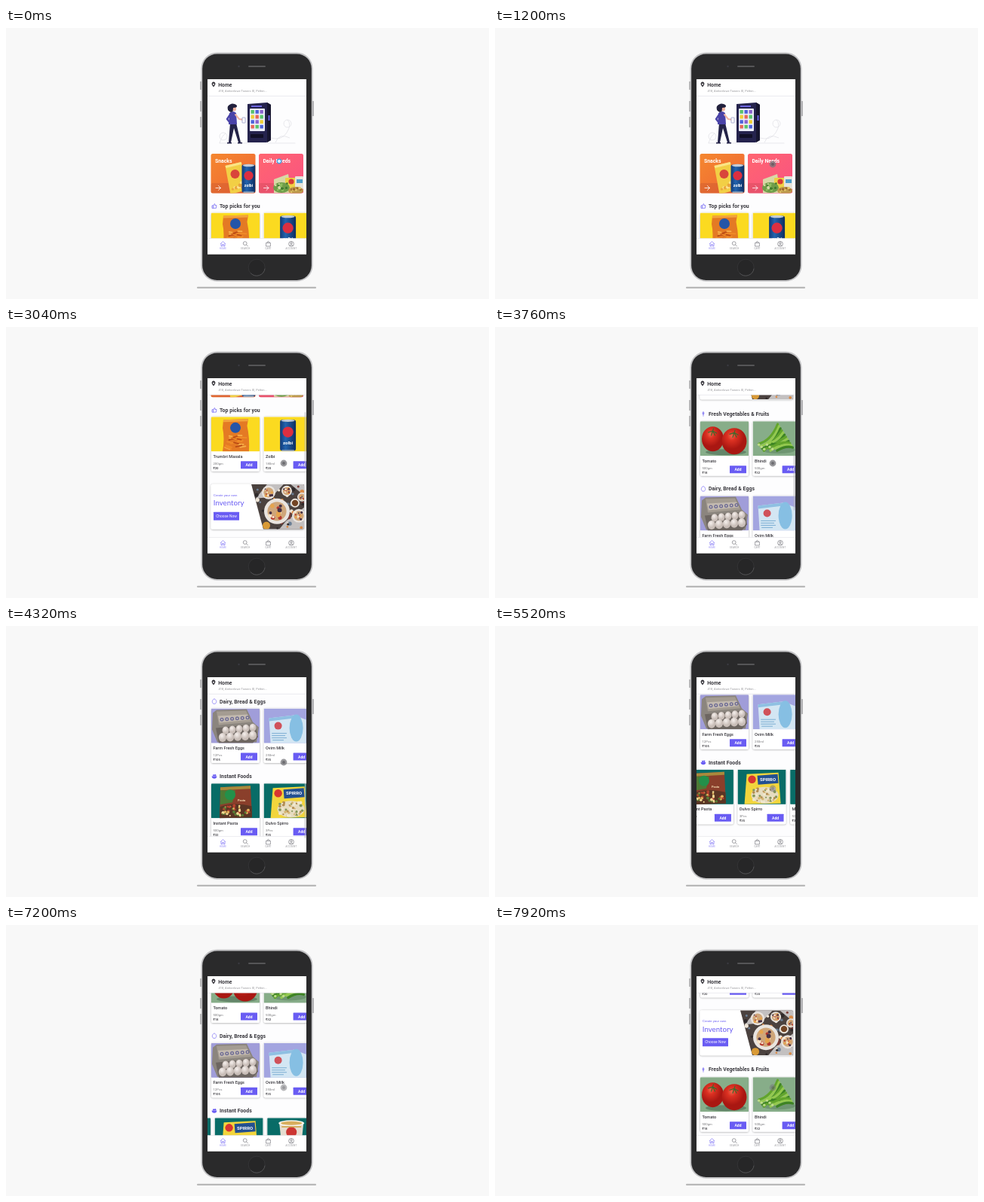
An HTML page for the animation above (8000 ms loop, 640x360 px).

```html
<!DOCTYPE html>
<html lang="en">
<head>
<meta charset="utf-8">
<title>Grocery app scroll</title>
<style>
html, body { margin: 0; width: 100%; height: 100%; overflow: hidden; background: #f8f8f8; }
svg { display: block; width: 100vw; height: 100vh; }
text { font-family: Roboto, Arial, sans-serif; }
</style>
</head>
<body>
<svg id="stage" viewBox="0 0 640 360"></svg>
<script>
const LOOP = 8000, BLUE = '#695cf3', INK = '#3a393f';

const rect = (x, y, w, h, fill, r = 0, more = '') =>
  `<rect x="${x}" y="${y}" width="${w}" height="${h}" rx="${r}" fill="${fill}" ${more}/>`;
const circle = (x, y, r, fill, more = '') => `<circle cx="${x}" cy="${y}" r="${r}" fill="${fill}" ${more}/>`;
const oval = (x, y, a, b, fill, more = '') =>
  `<ellipse cx="${x}" cy="${y}" rx="${a}" ry="${b}" fill="${fill}" ${more}/>`;
const shape = (d, fill, more = '') => `<path d="${d}" fill="${fill}" ${more}/>`;
const line = (d, color, w = 1) =>
  `<path d="${d}" fill="none" stroke="${color}" stroke-width="${w}" stroke-linecap="round" stroke-linejoin="round"/>`;
const text = (x, y, size, s, fill = INK, weight = 400, more = '') =>
  `<text x="${x}" y="${y}" font-size="${size}" font-weight="${weight}" fill="${fill}" ${more}>${s}</text>`;
const at = (x, y, body) => `<g transform="translate(${x} ${y})">${body}</g>`;
const times = (n, f) => Array.from({ length: n }, (_, i) => f(i)).join('');
const mid = 'text-anchor="middle"';

// Seeded random numbers for crumbs and garnish
let seed = 7;
const rnd = () => (seed = (seed * 16807) % 2147483647) / 2147483647;
const specks = (n, x, y, w, h, colors, r = 1.5) =>
  times(n, i => circle((x + rnd() * w).toFixed(1), (y + rnd() * h).toFixed(1), r * (.6 + rnd() * .7), colors[i % colors.length]));

const can = (w, h) =>
  rect(0, 1, w, h - 2, 'url(#can)', w * .14) +
  oval(w / 2, 2, w * .42, 1.7, '#c3ccd6') +
  rect(w * .1, h - 2.2, w * .8, 1.8, '#9aa8b8', .8) +
  circle(w / 2, h * .4, w * .34, '#dc2f40') +
  text(w / 2, h * .78, w * .29, 'zolbi', '#fff', 700, mid);

const plate = (x, y, r) =>
  circle(x, y, r, '#e9e4df') + circle(x, y, r * .74, '#cfa67a') +
  specks(12, x - r * .55, y - r * .55, r * 1.1, r * 1.1, ['#b5382d', '#e6a44d', '#f6e4c8', '#473246'], r * .15);

const tomato = (x, y, a, b) =>
  oval(x, y, a, b, 'url(#tom)') +
  line(`M${x} ${y - b * .65}l-6 2m6 -2l5 3m-5 -3l-2 6m2 -6l3 6m-3 -6l1 -3`, '#3f6a2c', 1.2);

// Product pictures, 64 by 46 each
const pics = {
  snack: () => rect(0, 0, 64, 46, '#fbda20') +
    shape('M16 4L49 3L47.5 12Q51 28 50 46H15Q18 28 15 15Z', '#e47a24') +
    shape('M16 4L49 3L48.5 6L16 7Z', '#f3a53c') +
    circle(32, 14.5, 7, '#2455a8') +
    times(22, () => line(`M${18 + rnd() * 23} ${24 + rnd() * 18}l${4 + rnd() * 4} ${rnd() * 6 - 3}`, ['#f7b04a', '#bb4b15', '#f08c28'][rnd() * 3 | 0], 1.8)),
  can: () => rect(0, 0, 64, 46, '#fbda20') + at(21.5, 3, can(21, 43)),
  tomato: () => rect(0, 0, 64, 46, '#87ad89') + oval(34, 41, 27, 4, '#64866a') +
    tomato(16.5, 23.5, 14.5, 16.5) + tomato(45, 26.5, 16.5, 17.5),
  okra: () => rect(0, 0, 64, 46, '#87ad89') + oval(34, 38, 22, 5, '#6f9672') +
    times(12, i => line(`M${8 + i * 2.2} ${30 + i % 4 * 3}Q${24 + i * 1.8} ${26 + i % 3 * 3} ${33 + i * 1.8} ${4 + i * 2.8}`, ['#62a52c', '#93c94e', '#3e8423'][i % 3], 3.2)) +
    times(6, i => circle(8 + i * 3.6, 31 + i % 3 * 3, 1.7, '#bddb8a')),
  eggs: () => rect(0, 0, 64, 46, '#a09dd9') +
    shape('M2 6L7 2L47 1L55 18L63 25L60 45H8L1 28Z', '#8b857e') +
    shape('M7 4L46 3L53 18L10 22Z', '#a49c92') + shape('M9 10L48 8L51 15L11 19Z', '#c3bab0') +
    times(6, i => circle(14 + i * 6.8, 14.6 - i * .5, 2.5, '#6f6d94') + circle(14 + i * 6.8, 14.6 - i * .5, 1, '#d8cec0')) +
    shape('M6 26L58 21L62 38L55 46H10Z', '#6d6661') +
    times(5, i => oval(19 + i * 9, 29 - i * .9, 4.5, 5.2, 'url(#egg)')) +
    times(5, i => oval(15 + i * 10, 38.5 - i * .7, 5.2, 6, 'url(#egg)')),
  milk: () => rect(0, 0, 64, 46, '#a3a5e0') +
    shape('M7 13L40 9L56 15V46H9Z', '#d3e6f3') + shape('M7 13L40 9L40.5 13L7 17Z', '#8fc0e2') +
    circle(19, 23, 5, '#d0525a') + oval(43, 26, 9, 18, '#86bfe3') +
    line('M11 33H30M11 36H28M11 39H30M12 42H26', '#7caed3', 1),
  pasta: () => rect(0, 0, 64, 46, '#086c67') +
    shape('M12 5L52 3L54 45L11 46Z', '#8a3f2b') + shape('M12 5L52 3V7L12 9Z', '#a98a3c') +
    shape('M12 9H32L28 25L12 28Z', '#4d7a35') +
    circle(25, 15, 7, '#23904a') + text(35, 24, 4, 'Pasta', '#f5dbb0', 700) +
    shape('M11.5 31Q30 24 53.5 30L54 45L11 46Z', '#5a3524') +
    specks(42, 14, 29, 37, 14, ['#e3b35b', '#b5422e', '#f1d992', '#587c35'], 1.6),
  spiral: () => rect(0, 0, 64, 46, '#086c67') +
    shape('M12 6L54 4L57 45L9 46Z', '#f2d53c') + circle(19, 13, 5.2, '#d83631') +
    shape('M26 8L53 6L54 18L27 20Z', '#245091') + text(40, 15.2, 6, 'SPIRRO', '#fff', 700, mid) +
    oval(36, 34, 18, 11, '#e6dcc0') + specks(42, 21, 25, 30, 18, ['#d4b573', '#f0e8cf', '#84965a', '#b18b52'], 1.6),
  cup: () => rect(0, 0, 64, 46, '#086c67') +
    shape('M16 7H48L44 46H20Z', '#e6ddd0') + oval(32, 7, 17, 4, '#f7f3ea') + oval(32, 7, 14, 2.5, '#d7ae5d') +
    circle(32, 19, 7, '#cc3633') + rect(19, 11, 26, 1.5, '#cf9f3e') +
    specks(30, 22, 30, 20, 14, ['#c9402e', '#e1b356', '#528f45', '#eedda9'])
};

const card = (x, y, name, qty, price, pic) => at(x, y,
  rect(0, 0, 64, 72.5, '#fff', 2, 'filter="url(#soft)"') +
  `<g clip-path="url(#pic)">${pics[pic]()}</g>` +
  text(2.4, 54.7, 5.55, name, INK, 500) +
  text(2.4, 63.6, 4.3, qty, '#77777a') + text(2.4, 69.6, 4.3, price, INK, 500) +
  rect(39, 59, 22, 10, BLUE, .5) + text(50, 66, 5, 'Add', '#fff', 700, mid));

const row = (y, items) => items.map((it, i) => card(272 + i * 69.6, y, ...it)).join('');
const heading = (y, s, icon) => at(276, y - 2.5, icon) + text(283, y, 6.9, s, INK, 700, 'letter-spacing=".04"');

const icons = {
  thumb: line('M-2.6 -.6h1.3v3.4h-1.3zM-1.3 -.4L.3 -3Q1.5 -2.7 .9 -.8H3L2.4 2.8H-1.3', BLUE, .7),
  leaf: shape('M0 -3.3Q3 -.5 0 2Q-3 -.5 0 -3.3', '#a79ff5') + line('M0 -1V3.4', BLUE, .6),
  egg: shape('M0 -3.4C3.6 -2 3.6 3.3 0 3.3S-3.6 -2 0 -3.4', 'none', `stroke="${BLUE}" stroke-width=".6"`),
  bowl: shape('M-3.4 -.3H3.4Q3 3 0 3T-3.4 -.3', BLUE) + circle(-1, -1.4, 1.1, BLUE) + circle(1.2, -1.5, 1.2, BLUE)
};

const hero = () =>
  line('M283 153H383', '#d9d9e0', .6) +
  `<g fill="none" stroke="#e2e2e8" stroke-width=".8"><circle cx="288" cy="144" r="5"/><circle cx="373" cy="127" r="5"/>
   <path d="M351 146Q365 150 372 139T373 122M283 153Q286 143 291 140M357 152Q362 139 376 146"/></g>` +
  // Shopper
  shape('M297 126L295 152H298L302 133L308 152H311L305 126Z', '#242348') +
  shape('M293 152H299V153.5H293ZM307 152H313V153.5H307Z', '#242348') +
  shape('M296 113Q301 109 305 113L306 128H295Z', '#4a43a8') +
  line('M304 115L309 121L315 122', '#f0b3a1', 2) + line('M297 115L293 121L297 126', '#4a43a8', 2.4) +
  circle(302, 107.5, 3, '#f0b3a1') +
  shape('M298 112Q292 109 294 104Q298 99 303 101Q308 103 305 105.5L301 106L300.5 111Z', '#22213d') +
  rect(313, 119, 4, 7, '#fff', .5, 'stroke="#777ab5" stroke-width=".6"') +
  // Vending machine
  shape('M320 101L346 99L351 102V149L345 152H320Z', '#25234d') +
  shape('M346 99L351 102V149L346 152Z', '#17162f') +
  rect(323, 107, 20, 30, '#eceef8', 1) +
  times(12, i => rect(324.5 + i % 3 * 6, 109 + (i / 3 | 0) * 6.6, 4.4, 4.8, ['#5ac46c', '#f0cf35', '#4d63db', '#e7685b', '#8a63cf'][i * 2 % 5], .5)) +
  rect(324, 141, 17, 5, '#111026', 1) + rect(347.5, 116, 2, 7, '#6a63e8') +
  rect(325, 103, 14, 2, '#6c65df');

const tile = (x, label, fill, body) => at(x, 167,
  rect(0, 0, 59, 52.5, fill, 2.5) + rect(0, 39, 59, 13.5, '#93302f', 2, 'opacity=".18"') +
  `<g clip-path="url(#tile)">${body}</g>` +
  text(5.4, 11.8, 6.9, label, '#fff', 700) + line('M6.5 45.5h6.5m-3 -3l3 3l-3 3', '#fff', .8));

const tiles = () =>
  tile(271.5, 'Snacks', 'url(#orange)',
    at(18, 14, shape('M1 2L22 -3L30 34L8 40Z', '#f2cf45') + shape('M1 2L22 -3L23 0L2 5Z', '#fbe486') +
      circle(14, 13, 6, '#d9453b') + specks(9, 11, 23, 14, 11, ['#eaa63d', '#fbe391'], 2)) +
    at(41, 13.5, can(18, 39))) +
  tile(335, 'Daily Needs', 'url(#pink)',
    shape('M20 34L39 27L43 52H20Z', '#d9d7a6') + rect(35, 32, 17, 16, '#eed045', 1) + circle(43, 37, 3.6, '#d73c34') +
    rect(48, 30, 11, 17, '#e8e4db', 1) + rect(50, 34, 8, 5, '#4f9eca') +
    oval(30, 45, 11, 7, '#6f9d4a') + specks(14, 21, 39, 18, 10, ['#8fbf5f', '#3e792d', '#d3d9a4']) +
    oval(49, 49, 10, 5, '#bd9a4c') + specks(8, 42, 45, 14, 6, ['#e4c868', '#9b642e']));

const banner = () =>
  rect(271.5, 335, 123.5, 60, '#fff', 2.5, 'filter="url(#soft)"') +
  text(275, 351.3, 4.35, 'Create your own', BLUE) +
  text(274.8, 363.5, 9.7, 'Inventory', BLUE, 400, 'style="font-family:Lato,sans-serif"') +
  rect(275, 372, 34, 11, BLUE, .5) + text(292, 379.3, 4.9, 'Choose Now', '#fff', 400, mid) +
  `<g clip-path="url(#photo)">` + rect(320, 335, 76, 60, '#4b423f') +
  shape('M346 335L368 335L352 352L331 354ZM371 384L395 366V395H362ZM377 335H395V350Z', '#c3c0c0') +
  specks(40, 328, 336, 66, 58, ['#d98a46', '#eee5d7', '#7c3a34', '#6b7f95', '#2f2a2b'], 2.2) +
  plate(359, 371, 17) + plate(348, 346, 9) + plate(388, 377, 9) + plate(372, 344, 7) + plate(392, 352, 6) +
  circle(383, 360, 6, '#ece7df') + circle(383, 360, 4.2, '#734525') + circle(345, 390, 5, '#d99a36') + '</g>';

const header = () =>
  rect(260, 60, 145, 30, '#fff') + line('M267 90.3H398', '#dedee2', .6) +
  shape('M275 78.4Q272.4 75.4 272.7 74.5A2.4 2.4 0 1 1 277.3 74.5Q277.6 75.4 275 78.4Z', INK) + circle(275, 74.8, 1, '#fff') +
  text(281.3, 78, 6.8, 'Home', INK, 700) +
  text(281.5, 85, 4.05, '418, Amberlowe Towers IX, Peltim...', '#98989c');

const tab = (x, label, icon, color) =>
  at(x, 286.8, `<g fill="none" stroke="${color}" stroke-width=".6" stroke-linejoin="round">${icon}</g>`) +
  text(x, 294, 2.8, label, color, 400, mid + ' letter-spacing=".3" opacity=".75"');

const nav = () =>
  rect(260, 279.5, 145, 30, '#fff') + line('M267 279.5H398', '#e3e3e8', .6) +
  tab(287.5, 'HOME', '<path d="M-3.4 0L0 -3.2L3.4 0M-2.5 -.6V3H-.8V.6H.8V3H2.5V-.6"/>', BLUE) +
  tab(317.3, 'SEARCH', '<circle cx="-.6" cy="-.7" r="2.4"/><path d="M1.2 1.1L3.4 3.3"/>', '#66666c') +
  tab(347.5, 'CART', '<path d="M-2.9 -1.4H2.9V3.2H-2.9ZM-1.4 -1.4Q-1.2 -3.4 0 -3.4T1.4 -1.4"/>', '#66666c') +
  tab(378, 'ACCOUNT', '<circle r="3.4"/><circle cy="-.9" r="1.2"/><path d="M-2.2 2.4Q0 -.3 2.2 2.4"/>', '#66666c');

const phone = () =>
  rect(253, 343.7, 158, 2.3, '#b8b8b8', 1.1, 'filter="url(#blur)"') +
  rect(257.4, 71, 2, 11, '#9a9a9c', .6) + rect(257.4, 97, 2, 14, '#9a9a9c', .6) +
  rect(257.4, 118, 2, 14, '#9a9a9c', .6) + rect(405.6, 97, 2, 20, '#8d8d90', .6) +
  rect(258.5, 32.5, 148, 304.2, '#c2c2c4', 21) + rect(260.2, 34.4, 144.6, 300.6, '#2a2a2b', 19.5) +
  rect(321, 50.1, 23, 2, '#555557', 1) + circle(308.5, 51, 1.2, '#3b3b42') +
  circle(332.2, 318.2, 11, '#262627', 'stroke="#38383a" stroke-width=".8"') +
  line('M324.5 326A11 11 0 0 0 343 320', '#58585a', .8);

const gradient = (id, a, b) =>
  `<linearGradient id="${id}" x2="1" y2="1"><stop stop-color="${a}"/><stop offset="1" stop-color="${b}"/></linearGradient>`;

const stage = document.getElementById('stage');
stage.innerHTML = `<defs>
  ${gradient('orange', '#f5872f', '#ee6535')}${gradient('pink', '#ff6570', '#f95382')}
  <linearGradient id="can"><stop stop-color="#123a78"/><stop offset=".35" stop-color="#2364ae"/><stop offset="1" stop-color="#0d2d60"/></linearGradient>
  <radialGradient id="tom" cx=".4" cy=".3"><stop stop-color="#f0664c"/><stop offset=".35" stop-color="#dc3122"/><stop offset="1" stop-color="#a91712"/></radialGradient>
  <radialGradient id="egg" cx=".4" cy=".3"><stop stop-color="#f6f0ed"/><stop offset="1" stop-color="#c9beb8"/></radialGradient>
  <filter id="soft" x="-10%" y="-10%" width="120%" height="120%"><feDropShadow dx="0" dy=".5" stdDeviation=".9" flood-opacity=".36"/></filter>
  <filter id="blur" x="-5%" y="-100%" width="110%" height="300%"><feGaussianBlur stdDeviation=".5"/></filter>
  <clipPath id="screen">${rect(267, 68, 131, 232.5, '#fff')}</clipPath>
  <clipPath id="view">${rect(267, 90, 131, 190, '#fff')}</clipPath>
  <clipPath id="pic">${rect(0, 0, 64, 46.2, '#fff', 1)}</clipPath>
  <clipPath id="tile">${rect(0, 0, 59, 52.5, '#fff', 2.5)}</clipPath>
  <clipPath id="photo"><path d="M325 335H393Q395 335 395 337V393Q395 395 393 395H341Z"/></clipPath>
</defs>
${rect(0, 0, 640, 360, '#f8f8f8')}${phone()}
<g clip-path="url(#screen)">${rect(260, 60, 145, 250, '#fdfdfe')}
  <g clip-path="url(#view)"><g id="list">${hero()}${tiles()}
    ${heading(239, 'Top picks for you', icons.thumb)}
    ${row(245.5, [['Trumbri Masala', '200gm', '₹20', 'snack'], ['Zolbi', '180ml', '₹20', 'can']])}
    ${banner()}
    ${heading(416.3, 'Fresh Vegetables &amp; Fruits', icons.leaf)}
    ${row(424, [['Tomato', '500gm', '₹18', 'tomato'], ['Bhindi', '500gm', '₹32', 'okra']])}
    ${heading(516.2, 'Dairy, Bread &amp; Eggs', icons.egg)}
    ${row(523.2, [['Farm Fresh Eggs', '12Pcs', '₹105', 'eggs'], ['Ovim Milk', '250ml', '₹35', 'milk']])}
    ${heading(615.8, 'Instant Foods', icons.bowl)}
    <g id="row">${row(622.8, [['Instant Pasta', '500gm', '₹32', 'pasta'], ['Dulvo Spirro', '3Pcs', '₹35', 'spiral'], ['Mug Noodles', '500gm', '₹32', 'cup']])}</g>
  </g></g>
  ${header()}${nav()}
  ${rect(395.8, 0, 1.5, 73, '#b8b8bd', .7, 'id="bar"')}
  <g id="dot">${circle(0, 0, 4.4, '#77777b', 'opacity=".75"')}${circle(0, 0, 2, '#505055', 'opacity=".6"')}</g>
  <g id="ring">${circle(0, 0, 2.8, '#d9efff', 'stroke="#3d9be0" stroke-width="1.3"')}</g>
</g>`;

// Smooth monotone curve through [time, value] points
function curve(points) {
  const slope = i => (points[i + 1][1] - points[i][1]) / (points[i + 1][0] - points[i][0]);
  const tangent = points.map((_, i) => {
    if (!i || i === points.length - 1) return 0;
    const a = slope(i - 1), b = slope(i);
    return a * b <= 0 ? 0 : 2 * a * b / (a + b);
  });
  return t => {
    if (t <= points[0][0]) return points[0][1];
    const i = points.findIndex(p => p[0] >= t) - 1;
    if (i < 0) return points[points.length - 1][1];
    const [t0, a] = points[i], [t1, b] = points[i + 1], d = t1 - t0, u = (t - t0) / d, v = 1 - u;
    return a * (1 + 2 * u) * v * v + b * u * u * (3 - 2 * u) + d * u * v * (tangent[i] * v - tangent[i + 1] * u);
  };
}

const scroll = curve([[1440, 0], [2080, 36], [3040, 126], [4320, 413.5], [4640, 432], [6640, 432], [7920, 222], [8240, 180]]);
const swipe = curve([[5200, 0], [5520, 20], [6240, 65]]);
const barFade = curve([[1440, 0], [1600, .8], [4640, .8], [4960, 0]]);
const dotX = curve([[880, 362], [1200, 368]]);
const dotY = curve([[880, 177], [1200, 181], [4720, 181], [5120, 216]]);

const [list, shelf, bar, dot, ring] = ['list', 'row', 'bar', 'dot', 'ring'].map(id => document.getElementById(id));
const move = (el, x, y) => el.setAttribute('transform', `translate(${x.toFixed(2)} ${y.toFixed(2)})`);

function draw(t) {
  const y = scroll(t);
  move(list, 0, -y);
  move(shelf, -swipe(t), 0);
  bar.setAttribute('y', 71 + y / 3);
  bar.setAttribute('opacity', barFade(t));
  move(dot, dotX(t), dotY(t));
  move(ring, dotX(t), dotY(t));
  dot.setAttribute('opacity', t < 400 ? 0 : t < 4720 ? 1 : .7);
  ring.setAttribute('opacity', t < 400 ? 1 : 0);
}

const start = performance.now();
function tick() {
  draw((performance.now() - start) % LOOP);
  requestAnimationFrame(tick);
}
tick();
</script>
</body>
</html>
```
